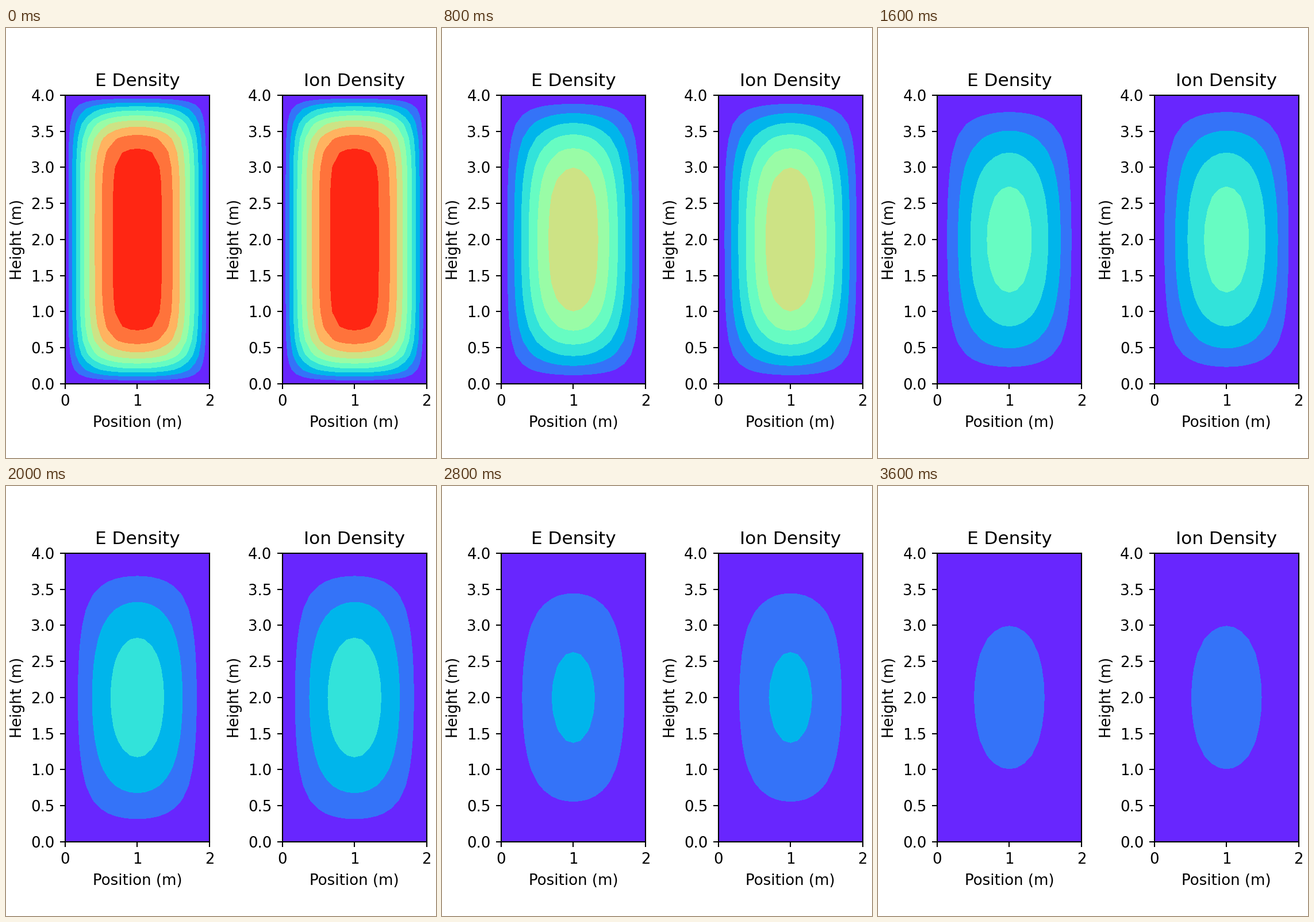
Recreate the animation shown at these times as a matplotlib script. Size 748x748 px, loop 4.6 s.

```python
import numpy as np
import matplotlib.pyplot as plt
from matplotlib.animation import FuncAnimation

SIZE, DPI = 748, 187
N = 20                  # grid cells along each axis
WIDTH, HEIGHT = 2.0, 4.0
DIFFUSION = 0.0796      # diffusion coefficient times time per state
STATES = 10
LEVELS = np.linspace(0, 1, 11)

plt.rcParams["font.family"] = "DejaVu Sans"
x = np.linspace(0, WIDTH, N + 1)
y = np.linspace(0, HEIGHT, N + 1)


def profile(length, t):
    """Uniform density diffusing between two absorbing walls."""
    m = np.arange(1, N, 2)
    angle = m * np.pi / (2 * N)
    rate = (2 * N / length * np.sin(angle)) ** 2
    weight = 2 / N / np.tan(angle) * np.exp(-rate * t)
    modes = np.sin(np.pi * np.outer(np.arange(N + 1), m) / N)
    return np.clip(modes @ weight, 0, 1)


def density(state):
    t = DIFFUSION * (state + 1)
    return np.outer(profile(HEIGHT, t), profile(WIDTH, t))


def make_panel(left, title):
    ax = fig.add_axes([left / SIZE, 1 - 619 / SIZE, 251.2 / SIZE, 502.2 / SIZE])
    ax.set(title=title, xlabel="Position (m)", ylabel="Height (m)",
           xlim=(0, WIDTH), ylim=(0, HEIGHT),
           xticks=[0, 1, 2], yticks=np.arange(0, 4.1, 0.5))
    return ax


fig = plt.figure(figsize=(SIZE / DPI, SIZE / DPI), dpi=DPI)
panels = [make_panel(102.8, "E Density"), make_panel(480.6, "Ion Density")]
fills = []


def draw(i):
    while fills:
        fills.pop().remove()
    n = density(min(i // 2, STATES - 1))
    for ax in panels:
        fills.append(ax.contourf(x, y, n, levels=LEVELS, cmap="rainbow"))
    return []


# Each state lasts two ticks; the last one is held for five.
anim = FuncAnimation(fig, draw, frames=23, interval=200,
                     init_func=lambda: draw(0), repeat=True, repeat_delay=0)
plt.show()
```
